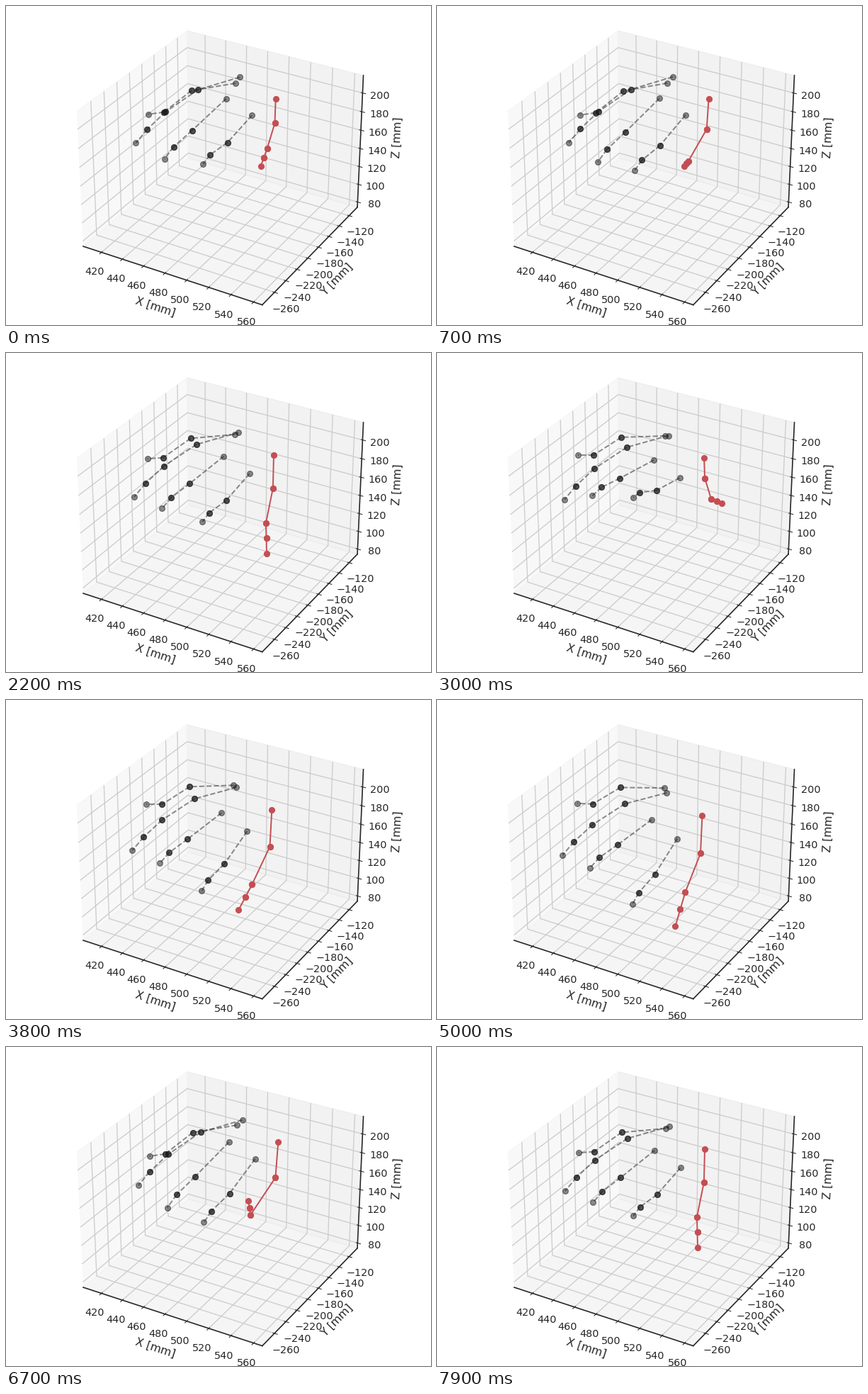
Animation of 600 by 450 pixels, one loop 8 s. Source, as a matplotlib script:

```python
import numpy as np
import matplotlib.pyplot as plt
from matplotlib.animation import FuncAnimation

W, H, FRAMES, STEP = 600, 450, 80, 100
INK, RED = "0.1", "#c44e52"

plt.rcParams.update({
    "font.family": "DejaVu Sans",
    "axes.linewidth": 1.25, "axes.edgecolor": "0.15",
    "axes.labelcolor": "0.15", "axes.labelsize": 12,
    "xtick.color": "0.15", "ytick.color": "0.15",
    "xtick.labelsize": 11, "ytick.labelsize": 11,
    "grid.color": "0.8", "grid.linewidth": 1,
    "lines.linewidth": 1.5, "lines.markersize": 6,
})

fig = plt.figure(figsize=(6.4, 4.8), dpi=W / 6.4)
box = fig.add_axes([0, 0, 1, 1], projection="3d")
box.set(xlim=(402.3, 567.6), ylim=(-281.1, -103.2), zlim=(74.1, 218.5),
        xticks=range(420, 561, 20), yticks=range(-260, -119, 20),
        zticks=range(80, 201, 20),
        xlabel="X [mm]", ylabel="Y [mm]", zlabel="Z [mm]")

# Flat layer over the 3D box, measured in stage pixels with y down.
layer = fig.add_axes([0, 0, 1, 1])
layer.set(xlim=(0.7, W + 0.7), ylim=(H + 0.7, 0.7))
layer.set_axis_off()

# Points are complex numbers x + yj.
# Pose: hand shift, index curl, thumb middle joint and tip from its knuckle.
OPEN = (6 - 27j, -0.24, -12 + 70j, -21 + 95j)
PINCH = (12 - 28j, 0.03, -43 + 104j, -47 + 95j)
TUCK = (10 - 24j, 0.09, -39 + 103j, -42 + 83j)
POINT = (3 - 13j, -0.25, -11 + 96j, -10 + 139j)
SPREAD = (2 - 8j, -0.88, 10 + 58j, 25 + 64j)
REST = (0j, 0, -28 + 105j, -47 + 141j)
LOW = (-1 + 9j, 0.13, -24 + 108j, -38 + 156j)

# The recording restarts with a hard cut at 53.
KEYS = [(0, OPEN), (13, PINCH), (21, POINT), (25, POINT), (29, SPREAD),
        (31, SPREAD), (38, REST), (50, LOW), (52, LOW), (53, OPEN),
        (54, OPEN), (67, TUCK), (75, POINT), (79, POINT)]
TIMES = [time for time, _ in KEYS]
TRACKS = np.array([pose for _, pose in KEYS], complex).T


def chain(count, color, style, alpha):
    """Separate bones, so that inner joints are painted twice."""
    return [layer.plot([], [], style, marker="o", color=color, alpha=alpha)[0]
            for _ in range(count)]


def place(bones, joints):
    for bone, a, b in zip(bones, joints, joints[1:]):
        bone.set_data([a.real, b.real], [a.imag, b.imag])


class Finger:
    """Resting joints that follow the hand and shear up or down with it."""

    def __init__(self, joints, follow, lift, curl, pull=0):
        self.knuckle = joints[0]
        self.shape = np.array(joints) - joints[0]
        self.follow, self.lift, self.curl, self.pull = follow, lift, curl, pull
        self.bones = chain(len(joints) - 1, INK, "--", 0.5)

    def move(self, shift, curl, *_):
        drop = -shift.imag * self.lift + curl.real * self.curl
        swing = -shift.real * self.pull + 1j * drop
        base = self.knuckle + self.follow * shift
        place(self.bones, base + self.shape - self.shape.real * swing)


class Thumb:
    """Four bones derived from the knuckle, the middle joint and the tip."""

    def __init__(self, knuckle, follow):
        self.knuckle, self.follow = knuckle, follow
        self.bones = chain(4, RED, "-", 1)

    def move(self, shift, _, mid, tip):
        first = 0.1 * mid.real + 0.49j * mid.imag
        joints = np.array([0, first, mid, (mid + tip) / 2, tip])
        place(self.bones, self.knuckle + self.follow * shift + joints)


HAND = [
    Finger([322 + 121j, 260 + 123j, 221 + 148j, 199 + 148j],
           follow=0.42, lift=0.0055, curl=0.05),
    Finger([326 + 124j, 267 + 140j, 221 + 170j, 195 + 194j, 179 + 213j],
           follow=0.85, lift=0.001, curl=0),
    Finger([305 + 160j, 257 + 197j, 231 + 216j, 218 + 231j],
           follow=1.05, lift=0.009, curl=0.35),
    Finger([341 + 186j, 309 + 232j, 286 + 255j, 277 + 270j],
           follow=1.15, lift=0, curl=1, pull=0.013),
    Thumb(376 + 156j, follow=0.9),
]


def draw(frame):
    pose = [np.interp(frame, TIMES, track) for track in TRACKS]
    for part in HAND:
        part.move(*pose)
    return [bone for part in HAND for bone in part.bones]


anim = FuncAnimation(fig, draw, frames=FRAMES, interval=STEP,
                     repeat=True, repeat_delay=0, blit=False)
plt.show()
```
